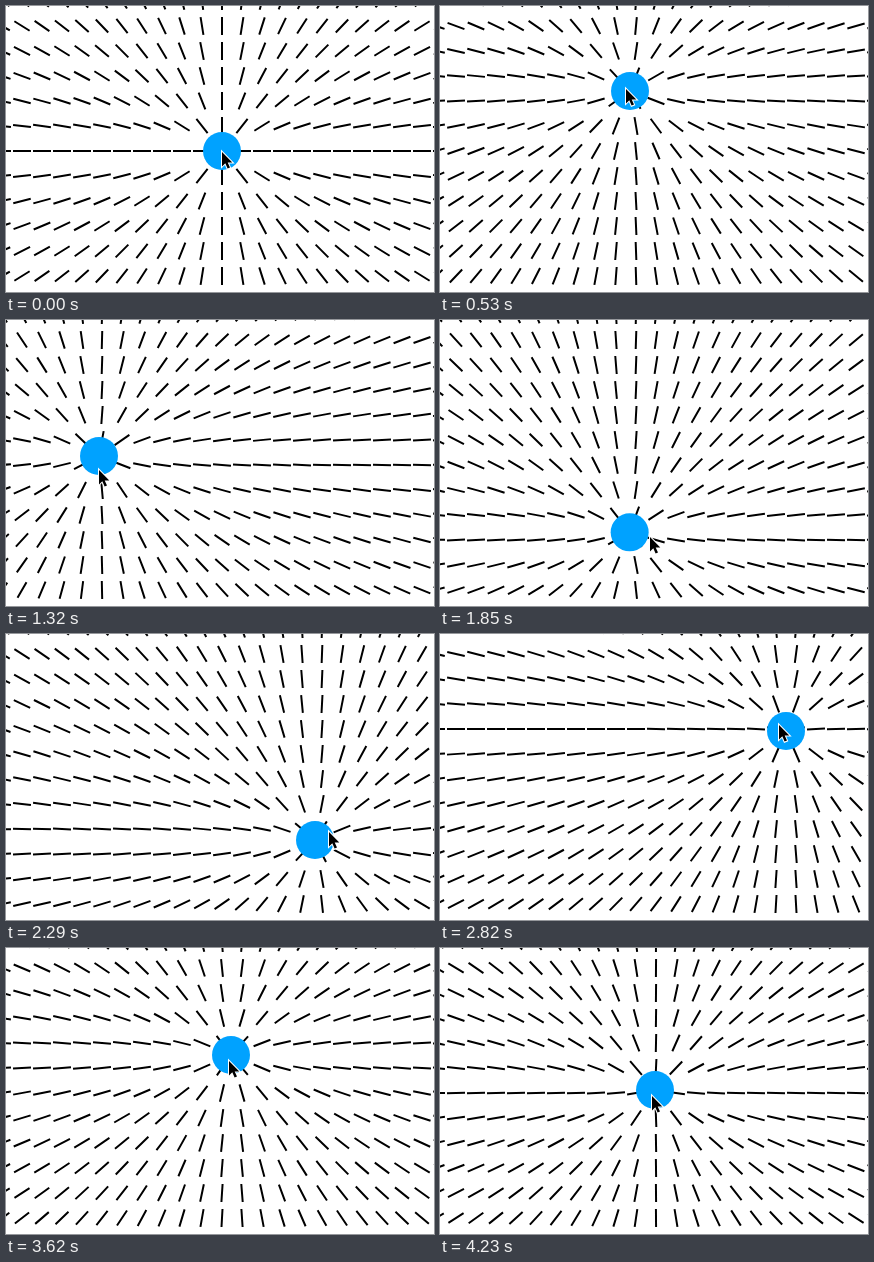
An HTML page with a canvas that plays this animation: 428 by 286 pixels, repeating every 4.32 s.

```html
<!DOCTYPE html>
<html lang="en">
<head>
<meta charset="utf-8">
<style>
  html, body { margin: 0; width: 100%; height: 100%; overflow: hidden; background: #fff; }
  canvas { display: block; }
</style>
</head>
<body>
<canvas id="stage" width="428" height="286"></canvas>
<script>
const ctx = document.getElementById('stage').getContext('2d');
const LOOP = 4320, STEPS = 49, STEP = LOOP / STEPS;
const LAG = 0.8; // how far the disc trails the pointer, in steps

// step, disc x, disc y, pointer offset x, pointer offset y
const keys = [
  [0, 216, 145, 0, 1],
  [6, 190, 85, -4, -2],
  [15, 93, 136, 0, 14],
  [26, 309, 206, 14, -8],
  [32, 346, 97, -7, -6],
  [41, 225, 107, -2, 6],
  [48, 215, 142, -3, 6]
];

const arrow = new Path2D('M0 0V14.5L3.3 11.3L5.6 16.6L8 15.6L5.7 10.4H10.3Z');

// Cubic Hermite position, with the pointer leading along the velocity
function hermite(a, b, axis, u) {
  const span = b[0] - a[0];
  const p = a[axis], q = b[axis];
  const m = a[axis + 2] / LAG * span, n = b[axis + 2] / LAG * span;
  const c2 = 3 * (q - p) - 2 * m - n, c3 = 2 * (p - q) + m + n;
  const pos = p + u * (m + u * (c2 + u * c3));
  const speed = (m + u * (2 * c2 + u * 3 * c3)) / span;
  return [pos, pos + speed * LAG];
}

function draw(step) {
  const i = Math.max(1, keys.findIndex(k => k[0] >= step));
  const a = keys[i - 1], b = keys[i];
  const u = (step - a[0]) / (b[0] - a[0]);
  const [x, tipX] = hermite(a, b, 1, u);
  const [y, tipY] = hermite(a, b, 2, u);

  ctx.fillStyle = '#fff';
  ctx.fillRect(0, 0, 428, 286);

  ctx.beginPath();
  for (let gy = -5; gy <= 270; gy += 25) {
    for (let gx = -4; gx <= 436; gx += 20) {
      const angle = Math.atan2(y - gy, x - gx);
      const dx = 9 * Math.cos(angle), dy = 9 * Math.sin(angle);
      ctx.moveTo(gx - dx, gy - dy);
      ctx.lineTo(gx + dx, gy + dy);
    }
  }
  ctx.strokeStyle = '#000';
  ctx.lineWidth = 2;
  ctx.stroke();

  ctx.beginPath();
  ctx.arc(x, y, 19, 0, 2 * Math.PI);
  ctx.fillStyle = '#00a2ff';
  ctx.fill();

  ctx.save();
  ctx.translate(Math.round(tipX), Math.round(tipY));
  ctx.strokeStyle = '#fff';
  ctx.stroke(arrow);
  ctx.fillStyle = '#000';
  ctx.fill(arrow);
  ctx.restore();
}

const start = performance.now();
function tick() {
  const t = (performance.now() - start) % LOOP;
  draw(Math.min(STEPS - 1, Math.floor((t + 7) / STEP)));
  requestAnimationFrame(tick);
}
tick();
</script>
</body>
</html>
```
